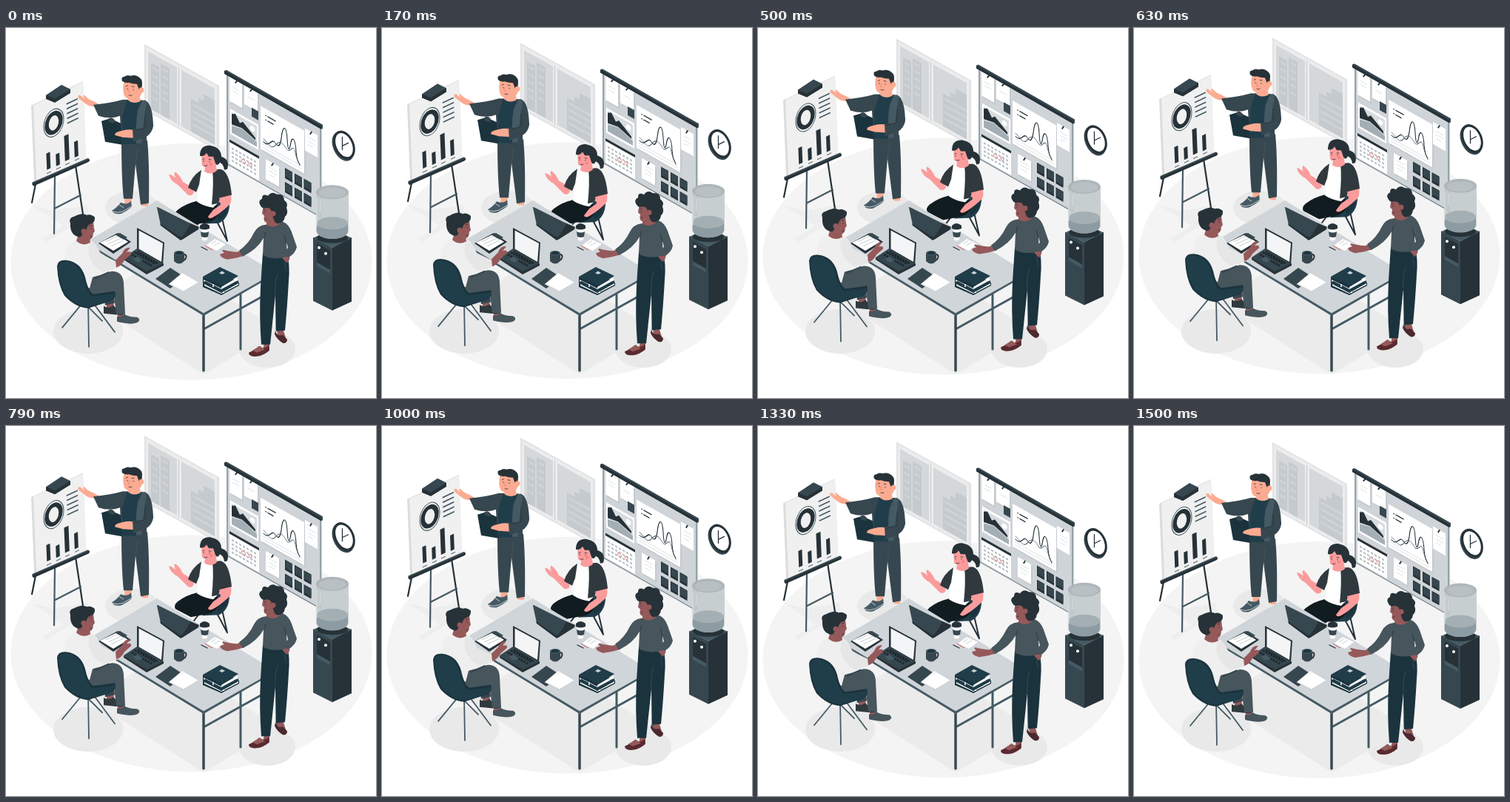
An HTML page that plays this animation: 500 by 500 pixels, repeating every 1.54 s.

```html
<!DOCTYPE html>
<html lang="en">
<head>
<meta charset="utf-8">
<title>Team meeting</title>
<style>
html, body { margin: 0; width: 100%; height: 100%; overflow: hidden; background: #fff; }
svg { display: block; width: 100%; height: 100%; }
.k { fill: #263238; } .d { fill: #37474f; } .m { fill: #455a64; } .n { fill: #1b333d; }
.t { fill: #203d4a; } .v { fill: #30393e; } .u { fill: #47555c; }
.w { fill: #fff; } .l { fill: #ececec; } .s { fill: #e9e9e9; } .g { fill: #cfd4d8; }
.p { fill: #fbab91; } .r { fill: #fb9c9c; } .b { fill: #95595a; } .c { fill: #c5cace; }
.ln { fill: none; stroke: #263238; stroke-linecap: round; stroke-linejoin: round; }
.lm { fill: none; stroke: #455a64; stroke-linecap: round; stroke-linejoin: round; }
</style>
</head>
<body>
<svg viewBox="0 0 500 500">
<g class="float"><ellipse cx="250.500" cy="316" rx="244" ry="160" fill="#f4f4f4"/></g>

<g class="s">
  <ellipse cx="111" cy="410" rx="47" ry="30"/>
  <ellipse cx="353" cy="434" rx="38" ry="25"/>
  <ellipse cx="170" cy="243" rx="36" ry="23"/>
  <path d="M115 371L210 308L368 408L267 468Z" fill="#ebebeb"/>
  <path d="M35 239L62 247L110 239L112 252L55 289L48 285L78 268Z" fill="#eee"/>
</g>

<g class="float">
  <g id="window" transform="matrix(1 .556 0 1 187 22)">
    <path d="M0 0H101V89H0Z" fill="#e0e2e3"/>
    <path class="l" d="M2 2H98V87H2Z"/>
    <path d="M5 7H44V83H5ZM50 7H95V83H50Z" fill="#d5d8da"/>
    <path class="c" d="M9 20H20V83H9ZM22 14H34V83H22ZM63 39H73V32H80V23H95V83H63Z"/>
    <path d="M11 26H18M11 36H18M11 46H18M11 56H18M11 66H18M24 20H32M24 30H32M24 40H32M24 50H32M24 60H32M65 45H95M65 54H95M65 63H95M65 72H95" stroke="#d0d4d7" stroke-width="3"/>
    <path d="M46.500 5V85" stroke="#c6cacd"/>
  </g>

  <g id="board" transform="matrix(1 .567 0 1 299 64)">
    <path class="g" d="M-1 -2H128V121H-1Z"/>
    <path d="M0 0V120H126V0" fill="none" stroke="#718087" stroke-width="1.200"/>
    <path class="c" d="M5 2H22V35H5ZM25 2H43V28H25ZM47 19H106V76H47ZM54 86H72V113H54Z"/>
    <path class="w" d="M3 0H20V33H3ZM23 0H41V26H23ZM4 43H42V77H4ZM3 85H43V118H3ZM45 16H104V74H45ZM105 12H122V42H105ZM52 84H70V111H52Z"/>
    <path class="d" d="M33 25H42V37H33Z"/>
    <path d="M6 46H40V74H6Z" fill="#d8dcde"/>
    <circle cx="34" cy="53" r="3.500" fill="#fff"/>
    <path fill="#a3afb5" d="M6 74V65L20 61L40 68V74Z"/>
    <path class="k" d="M6 63V49L11 46L17 55L21 51L38 63V66L20 60Z"/>
    <path class="k" d="M3 85H43V88.500H3Z"/>
    <g id="dates" fill="#b9c1c5"></g>
    <circle cx="22" cy="104" r="2.500" fill="none" stroke="#e78883"/><circle cx="31" cy="103" r="2" fill="none" stroke="#e78883"/>
    <path d="M48 70H101M48 66H101M56 92H67M56 97H67M56 102H64M109 22H119M109 27H119M109 32H116M7 12H16M7 17H16M27 13H37" stroke="#dde1e3"/>
    <path class="ln" stroke-width="1.100" d="M49 62C56 67 60 51 64 54C68 58 71 58 73 44C75 24 80 22 81 40C82 58 84 55 86 42C88 32 92 34 93 50C94 62 96 64 98 65"/>
    <path class="lm" stroke-width=".8" d="M49 58C56 60 59 68 65 58C72 45 76 50 80 54C85 60 89 39 92 53C94 62 96 60 98 67"/>
    <path class="ln" stroke-width="1.500" d="M52 25H52.200M55 25H65M52 31H52.200M55 31H62M11 4L14 -1M31 4L34 -1M60 88L62 84M112 16L114 12"/>
    <g id="notes"></g>
  </g>
  <path class="d" d="M295 58L298 57L428 131V136L426 137L295 62Z"/>
  <path class="k" d="M295 58L426 133V137L295 62Z"/>

  <g id="clock" transform="translate(456.500 158.500)">
    <g transform="rotate(-24)">
      <ellipse class="d" cx="-1.500" cy="1" rx="13.500" ry="21"/>
      <ellipse class="k" cx=".5" rx="13.500" ry="20.500"/>
      <ellipse class="w" cx=".5" rx="10.500" ry="17"/>
    </g>
    <path class="ln" stroke-width="1.300" d="M-2 -11L-2 1L6 -3M-2 1V6"/>
  </g>

  <g id="cooler">
    <path class="k" d="M441 297L467 283V370L441 382Z"/>
    <path class="d" d="M415 283L441 297V382L415 369Z"/>
    <path class="m" d="M415 284L441 272L467 284L441 297Z"/>
    <path class="k" d="M420 291L438 301V328L420 318Z"/>
    <path class="m" d="M420 317L438 327V332L420 322Z"/>
    <circle class="w" cx="423" cy="297" r="2"/><circle class="w" cx="432" cy="305" r="2"/>
    <path class="ln" stroke="#90a4ae" stroke-width="2" d="M424 302V305M432 309V313"/>
    <ellipse class="k" cx="441" cy="284" rx="21" ry="7"/>
    <path d="M419 222V274A22 11 0 0 0 463 274V222Z" fill="#c3cacd" opacity=".9"/>
    <path d="M420 264V275A21 10 0 0 0 462 275V264A21 8 0 0 1 420 264Z" fill="#8d9ba2"/>
    <ellipse cx="441" cy="264" rx="21" ry="8.500" fill="#a4afb4"/>
    <ellipse cx="441" cy="222" rx="22" ry="9.500" fill="#aeb6ba"/>
    <ellipse cx="441" cy="223" rx="18" ry="7" fill="#b9c0c4"/>
    <path d="M420 230V268M425 232V249" fill="none" stroke="#dde2e4"/>
  </g>

  <g id="easel">
    <path class="ln" stroke-width="2.200" d="M40 211L35 236M94 186L104 252"/>
    <path class="lm" stroke-width="2.200" d="M66 198L65 278M66 244L101 226"/>
    <g transform="matrix(1 -.47 .04 1 34 105)">
      <path fill="#dcdcdc" d="M0 0H70V105H0Z"/>
      <path fill="#f0f0f0" d="M3 1H70V104H3Z"/>
      <ellipse cx="29" cy="37" rx="13.500" ry="18" fill="none" stroke="#455a64"/>
      <ellipse cx="29" cy="37" rx="9.500" ry="12.500" fill="none" stroke="#263238" stroke-width="5.500"/>
      <path d="M47 20H62M47 26.500H62M47 33H62M47 39.500H62M47 46H62" stroke="#455a64" stroke-width="1.800"/>
      <path class="k" d="M17.500 73H22.500V95H17.500ZM30 80H35V96H30ZM42 61H48V95H42ZM55 75H60V96H55Z"/>
      <path d="M17 100H23M30 100H36M42 100H48M55 100H61" stroke="#455a64"/>
    </g>
    <path class="d" d="M35 209L111 176L113 178V180L37 213Z"/>
    <path class="k" d="M35 211L112 178V181L37 214Z"/>
    <path class="d" d="M54 91L75 77L87 83V88L66 101L54 96Z"/>
    <path class="k" d="M54 91L66 96L87 83V88L66 101L54 96Z"/>
  </g>

  <g id="presenter">
    <path class="p" d="M161 228L170 229L169 238L160 240ZM183 233L192 233L192 241L184 241Z"/>
    <path class="m" d="M143 247Q150 243 155 236Q164 240 169 234L170 242Q164 247 156 251Q146 253 143 247Z"/>
    <path d="M143 248Q150 251 158 248L170 241V244Q160 252 152 253Q144 253 143 248M153 239L159 243" fill="none" stroke="#e8eaeb" stroke-width=".8"/>
    <path class="d" d="M156 150L191 152Q194 184 193 237L182 239L175 184L171 231L159 231Q156 205 156 150Z"/>
    <path class="lm" stroke-width=".8" d="M175 184L178 163"/>
    <path class="p" d="M122 106Q114 107 108 103L98 95Q96 91 100 91L106 96Q103 90 106 91Q111 97 118 99L125 103Z"/>
    <path class="d" d="M118 104Q140 102 158 97L188 98Q198 102 199 132Q198 141 190 145V157H156L154 119Q141 124 125 119Z"/>
    <path class="t" d="M164 97L184 98L177 112Q175 132 176 157H157L157 120Z"/>
    <path class="m" d="M184 98L190 100L183 156H176Q175 124 179 110Z"/>
    <path class="p" d="M166 88H180L182 99Q172 104 165 98Z"/>
    <path class="p" d="M159 75Q159 68 169 68L184 77Q186 91 178 95Q165 99 160 92Q157 84 159 75Z"/>
    <path class="k" d="M157 72Q155 66 160 66Q164 63 168 65Q177 62 183 70Q185 74 183 82L180 84L177 76Q171 76 166 74Q161 75 157 72Z"/>
    <circle class="p" cx="183" cy="84" r="3.500"/>
    <path class="ln" stroke-width=".8" d="M162 79L164.500 78M170 79L173 79.500M164 82V83M172 83V84M166 91Q168 92 170 91"/>
    <path d="M167 82L165 87H168" fill="none" stroke="#e98a75" stroke-width=".8"/>
    <path class="n" d="M129 126L139 123L144 124L155 129L157 158L134 154Z"/>
    <path class="d" d="M138 123Q143 119 147 125L146 129L139 127Z"/>
    <path class="p" d="M173 138Q161 136 148 142L147 145L158 148L174 149Z"/>
    <path class="d" d="M171 137L185 136L188 112L199 131Q198 143 188 148L172 154Z"/>
    <path class="ln" stroke-width=".7" d="M188 118V135L174 139"/>
  </g>

  <g id="host">
    <path class="ln" stroke-width="2" d="M284 260L299 288M260 264L244 285M282 261L292 257L299 288"/>
    <path class="t" d="M280 239L302 230Q304 256 288 264L265 265Z"/>
    <path class="n" d="M283 244L300 235Q301 254 287 260Z"/>
    <path fill="#111c21" d="M258 234L285 240Q292 255 276 262L250 267L229 256Q226 251 232 246Q244 237 258 234Z"/>
    <path class="w" d="M262 193L283 192L287 236L280 243Q267 241 258 235Z"/>
    <path class="r" d="M249 214L254 222Q252 228 246 226L232 212Q222 207 220 198Q224 198 229 203Q226 195 229 195Q235 199 239 208Z"/>
    <path class="v" d="M264 192Q250 201 246 216L257 222L261 212Z"/>
    <path class="v" d="M279 192L290 191Q302 194 305 226L289 232L287 237L278 239Q281 211 279 192Z"/>
    <path class="r" d="M288 230L304 226Q306 237 300 241Q289 251 280 256Q274 259 273 255L280 246L290 239Z"/>
    <path class="r" d="M270 184L283 181L285 193Q276 200 268 194Z"/>
    <path class="r" d="M264 170Q269 162 285 168Q288 186 281 188Q270 191 265 186Z"/>
    <path class="k" d="M262 173Q262 158 276 159Q291 162 291 174Q303 178 299 191L295 192Q294 184 289 182Q286 188 283 183L280 174L274 174L271 169Q268 174 262 173Z"/>
    <path class="ln" stroke-width=".8" d="M266 177.500L268 177M274 177.500L277 178M267 179.500V180.500M275 180V181M268 186Q270 187.500 272 186"/>
    <circle cx="277" cy="184" r="2" fill="#ec777d" opacity=".65"/>
  </g>
</g>

<g id="table">
  <path class="lm" stroke-width="3" d="M267 389V463M317 359V434M366 335V407M267 407L364 353"/>
  <path class="d" d="M268.500 387V464H265.500V387Z"/>
  <path d="M108 289L204 233L364 331L267 386Z" fill="#d0d5d9"/>
  <path class="m" d="M108 289L267 385L364 330V333L267 389L108 292Z"/>
  <path d="M108 289L267 385L364 330" fill="none" stroke="#dce1e4" stroke-width=".6"/>

  <path class="k" d="M247 263L261 269L260 272L238 286L233 284Z"/>
  <path class="d" d="M204 243Q203 241 207 243L247 263Q249 265 248 267L236 286L209 266Z"/>
  <path class="k" d="M208 264L236 283L258 270L260 272L236 287L209 267Z"/>

  <path class="k" d="M177 270L214 290L212 320L177 300Z"/>
  <path d="M179.500 273.500L212 291L210 316L179.500 298.500Z" fill="#f4f5f6"/>
  <path class="d" d="M177 298L213 319L190 330L159 310Z"/>
  <path class="k" d="M159 310L190 329L213 318V321L190 333L159 313Z"/>
  <path d="M174 303L202 319M170 306L198 322M178 302L205 318" stroke="#1c262b" stroke-width="2.500" stroke-dasharray="3 1"/>
  <path class="m" d="M171 312L178 309L185 314L178 317Z"/>

  <path class="k" d="M125 291L151 277L169 289L145 305Z"/>
  <path class="w" d="M127 290L150 279L165 289L145 301Z"/>
  <path d="M135 289L151 281M138 292L155 284M142 295L159 287" stroke="#b9c1c5" stroke-width=".8"/>
  <path class="d" d="M147 279L154 277L164 283L159 286Z"/>

  <path class="w" d="M270 294L282 285L297 292L285 301Z"/>
  <path d="M277 292L284 288M281 294L289 290" stroke="#cbd1d4"/>
  <path class="ln" stroke-width="1.300" d="M264 296L272 300"/>
  <path d="M269 294L279 300" stroke="#d97970" stroke-width="1.300"/>
  <path class="w" d="M263 270H274L272 286Q268 289 265 286Z"/>
  <path class="d" d="M263 275Q269 278 274 275L273 282Q269 284 264 282Z"/>
  <path class="k" d="M262 267Q268 261 275 267V271Q268 274 262 271Z"/>

  <path d="M240 306Q246 306 242 313L239 314" fill="none" stroke="#263238" stroke-width="2"/>
  <path class="d" d="M227 304H241V315Q234 322 227 315Z"/>
  <ellipse class="m" cx="234" cy="304" rx="7" ry="3"/><ellipse class="n" cx="234" cy="304" rx="5" ry="2"/>

  <path class="d" d="M202 339L222 324L242 337L222 352Z"/>
  <path class="w" d="M220 346L238 331L260 344L240 356Z"/>
  <path d="M220 346L240 356L260 344" fill="none" stroke="#c9cfd2"/>

  <path class="n" d="M266 344L290 330L315 344V348L291 361L266 350Z"/>
  <path class="w" d="M268 346L291 358L314 345V347L291 359L268 348Z"/>
  <path class="t" d="M266 342L290 354L314 341L314 343L291 357L266 345Z"/>
  <path class="w" d="M268 338L291 350L313 337V341L291 353L268 341Z"/>
  <path class="t" d="M266 336L289 323L314 335L291 349Z"/>
  <path class="n" d="M266 336L291 348V352L267 340V343L266 343Z"/>
  <path class="w" d="M288 331L292 328.500L296 331L292 333Z" opacity=".75"/>
  <path d="M280 346V350M294 356V358" stroke="#fff" stroke-width="1.500"/>
</g>

<g class="float">
  <g id="sitter">
    <path class="lm" stroke-width="1.800" d="M104 371L76 405M111 371L112 431M118 372L147 411M106 372L130 396"/>
    <path class="b" d="M136 367L145 366L146 379L136 380ZM151 382L159 382L160 393L151 393Z"/>
    <path class="v" d="M132 376Q139 380 145 375Q150 381 160 383Q163 389 152 388L132 386Z"/>
    <path class="u" d="M150 390Q156 392 160 387Q166 391 177 391Q183 394 178 398Q170 402 150 397Z"/>
    <path class="d" d="M118 343L144 342L147 372L134 375L132 359Z"/>
    <path class="u" d="M104 340L143 329Q158 329 159 345L161 387L149 387L146 362L126 365L99 362Z"/>
    <path class="d" d="M117 332L136 324L140 331L120 340Z"/>
    <path fill="#efefef" d="M92 288L113 287Q122 290 128 306L149 316L151 324L128 334L117 337L113 352L86 339Q74 311 84 294Z"/>
    <path fill="#e6e6e6" d="M113 289Q122 292 128 306L149 316L151 324L131 330Q116 322 111 304Z"/>
    <path class="b" d="M148 314L157 305Q160 296 168 297L163 303Q170 301 169 306L160 314Q156 322 149 324Z"/>
    <path class="b" d="M99 276L112 278L114 290Q104 296 95 288Z"/>
    <path class="b" d="M102 262L118 262L119 271Q121 276 118 277Q118 287 109 287Q101 285 99 275Z"/>
    <path class="k" d="M87 264Q84 257 92 255Q103 249 109 253Q115 251 120 256Q121 264 112 266Q109 269 108 274L104 275Q103 285 96 282Q86 278 87 264Z"/>
    <circle class="b" cx="105" cy="275" r="3.500"/>
    <path class="ln" stroke-width=".8" d="M113 268L116 267M115 271V272M114 282H116"/>
    <path class="n" d="M69 322Q70 313 81 314Q101 316 107 337Q111 356 118 360L147 356Q151 367 136 371L111 379Q94 378 79 362Q70 347 69 322Z"/>
    <path class="t" d="M70.500 323Q72 315 81 316Q98 318 104 337Q109 357 116 363L147 359Q148 367 134 371L110 377Q94 375 81 361Q72 346 70.500 323Z"/>
  </g>

  <g id="stander">
    <path class="b" d="M349 424L356 424L356 434L347 438ZM366 406L374 406L378 419L367 416Z"/>
    <path d="M328 439Q337 435 342 430Q349 436 355 429L356 436Q348 443 339 444Q328 445 328 439Z" fill="#5a2a2f"/>
    <path d="M364 409Q366 418 374 415L380 421Q380 427 374 426Q366 421 363 414Z" fill="#4a2a2f"/>
    <path class="b" d="M333 436L343 430L350 435L339 439Z"/>
    <path class="n" d="M347 304L380 304Q384 322 382 342Q380 378 377 409L365 410L364 361L357 428L345 428Q342 390 344 350Z"/>
    <path d="M364 361Q363 342 367 332M377 309Q376 322 379 329" fill="none" stroke="#37535d" stroke-width=".8"/>
    <path class="b" d="M374 304L383 305Q385 312 380 318L373 311Z"/>
    <path class="b" d="M321 300L312 303Q300 302 294 300Q290 300 295 304L289 306Q290 311 299 313L311 311L322 308Z"/>
    <path class="u" d="M351 266L374 262Q382 265 386 276L393 296Q391 305 382 310L374 308L381 297L379 290L380 309Q361 315 347 307L348 284Q340 299 320 309L315 301Q328 292 335 277Q340 267 351 266Z"/>
    <path d="M349 283L351 276M379 291L376 280" fill="none" stroke="#263238" stroke-width=".8"/>
    <path class="b" d="M352 255L368 254L370 265Q360 272 352 266Z"/>
    <path class="b" d="M348 239L364 239L366 253Q363 263 352 263Q347 262 349 254L346 251Z"/>
    <path class="k" d="M345 242Q339 234 346 231Q346 223 354 227Q359 220 366 225Q376 224 376 233Q382 237 379 243Q382 251 377 255Q376 263 369 264Q363 266 361 256L359 249Q358 243 352 243Q348 245 345 242Z"/>
    <circle class="b" cx="361" cy="251" r="3.500"/>
    <path class="ln" stroke-width=".8" d="M349 246.500L351 246M350 249V250M350 258H352"/>
  </g>
</g>
</svg>
<script>
const LOOP = 1540, STEPS = 37, LEAD = 1.5, RISE = 9;
const get = id => document.getElementById(id);
const box = (x, y, w, h) => `<path d="M${x} ${y}h${w}v${h}h${-w}Z"/>`;

let dates = '', notes = '';
for (let row = 0; row < 4; row++)
  for (let col = 0; col < 7; col++) dates += box(6 + col * 5, 94 + row * 5.500, 3, 2.500);
for (const y of [81, 100])
  for (const x of [78, 91, 103.500]) {
    notes += `<g class="k">${box(x, y, 10, 14)}</g>`;
    notes += `<g class="d">${box(x + 1, y + 1, 9, 10)}</g>`;
  }
get('dates').innerHTML = dates;
get('notes').innerHTML = notes;

const floats = document.querySelectorAll('.float');
const start = performance.now();

function draw(now) {
  const t = Math.max(0, now - start) % LOOP;
  const step = Math.floor(t / LOOP * STEPS + .1);
  const y = -RISE * (1 - Math.cos((step + LEAD) / STEPS * 2 * Math.PI)) / 2;
  for (const g of floats) g.setAttribute('transform', `translate(0 ${y.toFixed(2)})`);
  requestAnimationFrame(draw);
}
draw(start);
</script>
</body>
</html>
```
